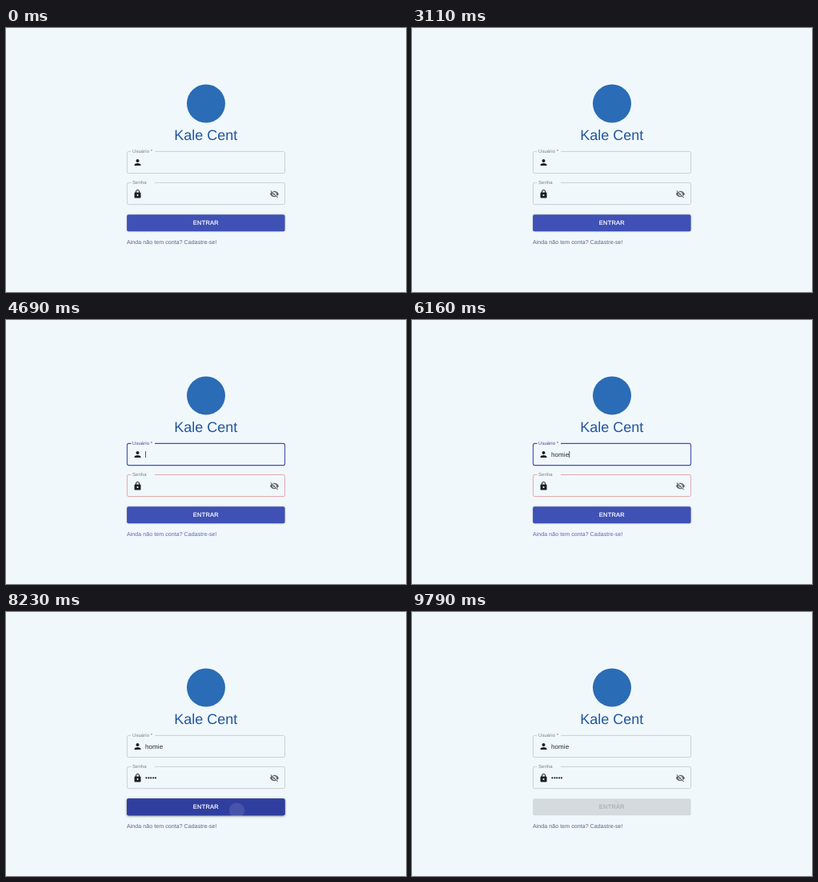
Write an HTML page that moves like this. It is 500 px wide and 330 px high and loops after 9910 ms.

```html
<!DOCTYPE html>
<html lang="pt">
<head>
<meta charset="utf-8">
<title>Kale Cent</title>
<style>
  html, body { margin: 0; width: 100%; height: 100%; overflow: hidden; background: #f1f8fc; }
  svg { display: block; width: 500px; height: 330px; }
  text { font-family: "Liberation Sans", Arial, sans-serif; text-rendering: geometricPrecision; white-space: pre; }
  .title { font-size: 18px; fill: #1f549f; text-anchor: middle; }
  .label { font-size: 6px; letter-spacing: .056px; fill: #7b8084; }
  .value { font-size: 8px; letter-spacing: .075px; fill: #24272b; }
  .value tspan { fill-opacity: 0; }
  .link { font-size: 7px; letter-spacing: .075px; }
  .action { font-size: 7.5px; letter-spacing: .21px; fill: currentColor; stroke: currentColor; stroke-width: .2; }
  .border { fill: none; stroke-width: .75; }
  .icon { fill: #1b1e26; }
  .eye { fill: #62686c; }
  .raised { fill: #3f51b5; filter: drop-shadow(0 .6px .8px rgba(0, 0, 0, .24)); }
  .hover { fill: #303f9f; filter: drop-shadow(0 1px 1.5px rgba(0, 0, 0, .36)); }
  .disabled { fill: #d4dade; }
  #ripple { fill: #fff; }
  #spinner { fill: none; stroke: #c3c9cd; stroke-width: 1; transform-origin: 250px 243.5px; }
</style>
</head>
<body>
<svg viewBox="0 0 500 330">
  <defs>
    <path id="outline" d="M186 154.4H346.6a2 2 0 0 1 2 2V179.6a2 2 0 0 1-2 2H153.4a2 2 0 0 1-2-2V156.4a2 2 0 0 1 2-2H156.5"/>
    <rect id="plate" x="151.1" y="233.2" width="197.5" height="21" rx="2"/>
    <clipPath id="clip"><use href="#plate"/></clipPath>
  </defs>

  <rect width="500" height="330" fill="#f1f8fc"/>
  <circle cx="250" cy="94.5" r="24" fill="#2a6cb5"/>
  <text class="title" x="249.7" y="139.6">Kale Cent</text>

  <use id="userBorder" class="border" href="#outline"/>
  <text id="userLabel" class="label" x="158" y="156.2">Usuário *</text>
  <path class="icon" transform="translate(158.5 162) scale(.5)" d="M12 12c2.21 0 4-1.79 4-4s-1.79-4-4-4-4 1.79-4 4 1.79 4 4 4zm0 2c-2.67 0-8 1.34-8 4v2h16v-2c0-2.66-5.33-4-8-4z"/>
  <text id="userText" class="value" x="174" y="171"></text>

  <use id="passBorder" class="border" href="#outline" y="39"/>
  <text id="passLabel" class="label" x="158" y="195.4">Senha</text>
  <path class="icon" transform="translate(158.5 201.5) scale(.5)" d="M18 8h-1V6c0-2.76-2.24-5-5-5S7 3.24 7 6v2H6c-1.1 0-2 .9-2 2v10c0 1.1.9 2 2 2h12c1.1 0 2-.9 2-2V10c0-1.1-.9-2-2-2zm-6 9c-1.1 0-2-.9-2-2s.9-2 2-2 2 .9 2 2-.9 2-2 2zm3.1-9H8.9V6c0-1.71 1.39-3.1 3.1-3.1s3.1 1.39 3.1 3.1v2z"/>
  <text id="passText" class="value" x="174" y="210"></text>
  <g id="reveal" transform="translate(308 202.8) scale(.39)">
    <path d="M2 12C5 7.5 9 6.5 12 6.5S19 7.5 22 12C19 16.5 15 17.5 12 17.5S5 16.5 2 12Z" fill="none" stroke="#2c3034" stroke-width="2.4"/>
    <circle cx="12" cy="12" r="3.6" fill="#2c3034"/>
  </g>
  <path class="eye" transform="translate(329.5 201.5) scale(.5)" d="M12 7c2.76 0 5 2.24 5 5 0 .65-.13 1.26-.36 1.83l2.92 2.92c1.51-1.26 2.7-2.89 3.43-4.75-1.73-4.39-6-7.5-11-7.5-1.4 0-2.74.25-3.98.7l2.16 2.16C10.74 7.13 11.35 7 12 7zM2 4.27l2.74 2.74C3.08 8.3 1.78 10.02 1 12c1.73 4.39 6 7.5 11 7.5 1.55 0 3.03-.3 4.38-.84L19.73 22 21 20.73 3.27 3zM7.53 9.8l1.55 1.55C8.6 13.4 10.2 15.4 12.65 14.92l1.55 1.55C10.6 18.2 5.6 14.4 7.53 9.8zm4.31-.78l3.15 3.15c.1-1.8-1.3-3.2-3.15-3.15z"/>
  <rect id="caret" width=".8" height="8" fill="#2c3034"/>

  <use id="raised" class="raised" href="#plate"/>
  <use id="hover" class="hover" href="#plate"/>
  <use id="disabled" class="disabled" href="#plate"/>
  <g clip-path="url(#clip)"><circle id="ripple" r="0"/></g>
  <text id="action" class="action" x="233.8" y="246.2">ENTRAR</text>
  <path id="spinner" d="M242.2 239A9 9 0 0 1 250 234.5"/>

  <text id="link" class="link" x="151" y="269.6">Ainda não tem conta? Cadastre-se!</text>
</svg>

<script>
const LOOP = 9910, STEP = 120;
const GREY = '#bcc3c7', DARK = '#54585c', RED = '#dc8a8b', BLUE = '#3f4fae';
const $ = id => document.getElementById(id);

// Holds each value from its time until the next one.
function track(el, prop, points) {
  const frames = points.map(([t, v]) => ({ offset: t / LOOP, [prop]: v, easing: 'step-end' }));
  frames.push({ offset: 1, [prop]: points[points.length - 1][1] });
  el.animate(frames, { duration: LOOP, iterations: Infinity });
}

// Samples a motion at the picture rate.
function run(from, to, fn) {
  const points = [];
  for (let t = from; t <= to; t += STEP) points.push([t, fn(t)]);
  return points;
}

// cubic-bezier(.4, 0, .2, 1)
function ease(x) {
  if (x <= 0) return 0;
  if (x >= 1) return 1;
  let lo = 0, hi = 1, u = .5;
  for (let i = 0; i < 24; i++) {
    u = (lo + hi) / 2;
    const at = 1.2 * (1 - u) ** 2 * u + .6 * (1 - u) * u * u + u ** 3;
    if (at < x) lo = u; else hi = u;
  }
  return 3 * (1 - u) * u * u + u ** 3;
}

const rise = (start, len) => t => ease((t - start) / len);
const fall = (start, len) => t => 1 - ease((t - start) / len);

// Field borders and labels
track($('userBorder'), 'stroke', [[0, GREY], [1990, DARK], [3110, GREY], [3720, RED], [4690, BLUE], [6280, DARK], [7630, GREY]]);
track($('userBorder'), 'strokeWidth', [[0, .75], [4690, 1.1], [6280, .75]]);
track($('passBorder'), 'stroke', [[0, GREY], [1500, DARK], [1620, GREY], [3720, RED], [6280, BLUE], [8230, GREY]]);
track($('passBorder'), 'strokeWidth', [[0, .75], [6280, 1.1], [8230, .75]]);
track($('userLabel'), 'fill', [[0, '#7b8084'], [3720, '#b5686c'], [4690, '#3f4a8c'], [6280, '#7b8084']]);
track($('passLabel'), 'fill', [[0, '#7b8084'], [6280, '#3f4a7c'], [8230, '#7b8084']]);
track($('link'), 'fill', [[0, '#566080'], [3600, '#5563ae'], [8230, '#566080']]);

// Typing
const userKeys = [5300, 5540, 5790, 6040, 6160];
const passKeys = [6520, 6640, 6760, 6880, 7130];

function type(el, text, keys, tone) {
  [...text].forEach((char, i) => {
    const span = document.createElementNS('http://www.w3.org/2000/svg', 'tspan');
    span.textContent = char;
    el.append(span);
    track(span, 'fillOpacity', [[0, 0], [keys[i], tone(i)], [7630, 1]]);
  });
}
type($('userText'), 'homie', userKeys, () => 1);
type($('passText'), '•••••', passKeys, i => i < 3 ? .3 : 1);

const spot = (x, y) => `translate(${x}px, ${y}px)`;
const userStops = [178.5, 183.1, 189.8, 191.7, 196.2];
track($('caret'), 'transform', [
  [0, spot(174, 164)],
  ...userKeys.map((t, i) => [t, spot(userStops[i], 164)]),
  [6280, spot(174, 203)],
  ...passKeys.map((t, i) => [t, spot(174 + 2.88 * (i + 1), 203)])
]);
track($('caret'), 'opacity', [[0, 0], [4690, 1], [8230, 0]]);
track($('reveal'), 'opacity', [[0, 0], [6520, 1], [8230, 0]]);

// Button states
track($('hover'), 'opacity', [
  [0, 0],
  ...run(3360, 3600, rise(3300, 250)),
  ...run(4080, 4320, fall(4040, 250)),
  ...run(7990, 8230, rise(7940, 250)),
  ...run(8350, 8590, fall(8300, 250))
]);
track($('raised'), 'opacity', [[0, 1], ...run(8350, 8590, fall(8300, 250))]);
track($('disabled'), 'opacity', [[0, 0], ...run(8350, 8590, rise(8300, 250))]);
track($('action'), 'color', [[0, '#fff'], [8470, '#c4c9cc'], [8590, '#a9aeb1']]);

// Click ripples
const clicks = [
  { x: 295.6, y: 243, down: 3575, up: 3700, from: 3600, to: 4320, size: 147 },
  { x: 288.5, y: 248, down: 8144, up: 8240, from: 8230, to: 8590, size: 132 }
];
const perClick = fn => clicks.flatMap(c => run(c.from, c.to, t => fn(c, t)));
const grown = (c, t) => ease((t - c.down) / 550);
const shade = (c, t) => (.1 + .2 * grown(c, t)) * (1 - ease((t - c.up) / 550)) * (t < c.to ? 1 : 0);
track($('ripple'), 'r', [[0, '0px'], ...perClick((c, t) => c.size * grown(c, t) + 'px')]);
track($('ripple'), 'opacity', [[0, 0], ...perClick(shade)]);
track($('ripple'), 'transform', [[0, spot(295.6, 243)], ...clicks.map(c => [c.from, spot(c.x, c.y)])]);

// Waiting indicator
track($('spinner'), 'opacity', [[0, 0], [8590, 1]]);
track($('spinner'), 'transform', [
  [0, 'rotate(-20deg)'], [8710, 'rotate(10deg)'], [8950, 'rotate(12deg)'],
  ...run(9190, 9790, t => `rotate(${12 + (t - 9070) / STEP * 12}deg)`)
]);
</script>
</body>
</html>
```
